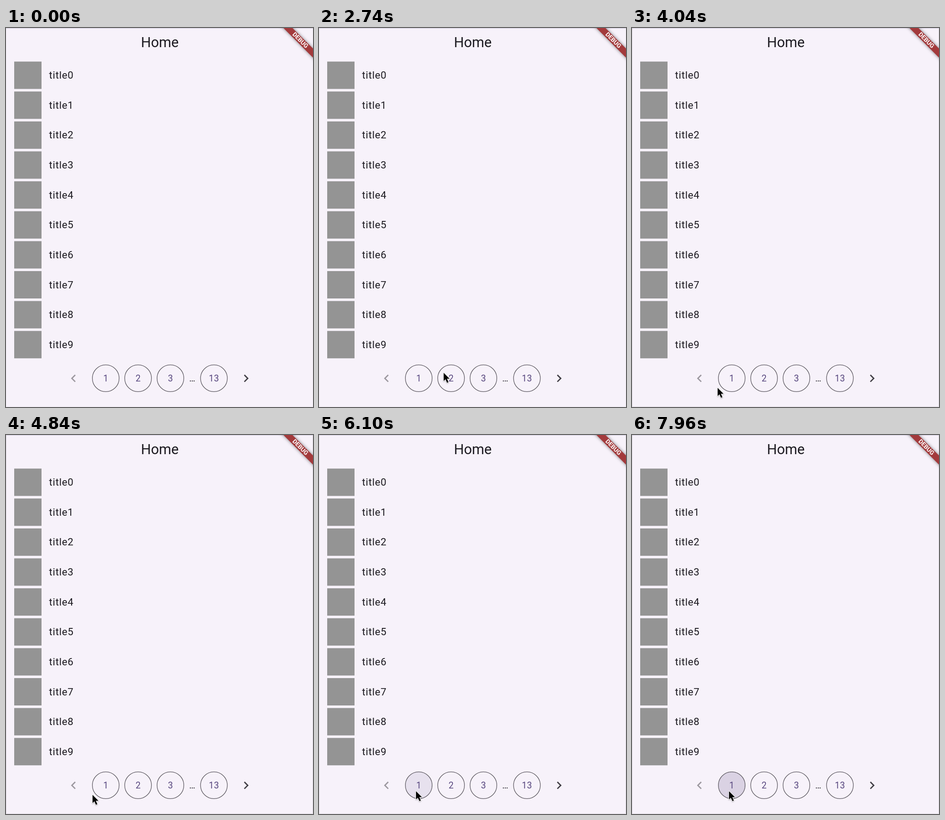
An HTML page that plays this animation: 674x831 px, repeating every 8000 ms.

```html
<!DOCTYPE html>
<html lang="en">
<head>
<meta charset="utf-8">
<title>Home</title>
<style>
  html, body { margin: 0; width: 100%; height: 100%; overflow: hidden; background: #f7f2fa; }
  #stage { position: relative; width: 674px; height: 831px; overflow: hidden; }
  svg { position: absolute; left: 0; top: 0; font-family: Roboto, sans-serif; }
  .title { font-size: 30.8px; fill: #1c1a20; text-anchor: middle; }
  .row { font-size: 22.3px; letter-spacing: .69px; fill: #1c1a20; }
  .page { font-size: 19.6px; letter-spacing: .14px; fill: #58477f; text-anchor: middle; }
  .ring { fill: none; stroke: #5c5860; stroke-width: 1.3; }
  #banner {
    position: absolute; left: 588px; top: 20px; width: 116px; height: 14px;
    transform: rotate(45deg); background: #a33a3c;
    box-shadow: 0 0 7px rgba(0, 0, 0, .5);
    font: 700 13.4px/14px Roboto, sans-serif; color: #fff; text-align: center;
  }
</style>
</head>
<body>
<div id="stage">
  <svg id="view" width="674" height="831" viewBox="0 0 674 831">
    <path d="M0 .5H674" stroke="#cbc4d8"/>
    <path id="edge" d="M.5 1V830.5H673.5V1" fill="none" stroke="#dcd8e0"/>
    <text class="title" x="337.7" y="42.3">Home</text>
    <g id="rows"></g>
    <circle id="ink" cx="219" cy="768" r="29.5" fill="#4a3a70" opacity="0"/>
    <g id="pages"></g>
    <text class="page" x="408.8" y="774.5" style="fill:#1c1a20">…</text>
    <path transform="translate(131.4 751.4) scale(1.4)" fill="#9c989f"
      d="M15.41 7.41L14 6l-6 6 6 6 1.41-1.41L10.83 12z"/>
    <path transform="translate(510.3 751.4) scale(1.4)" fill="#403d44"
      d="M10 6L8.59 7.41 13.17 12l-4.58 4.59L10 18l6-6z"/>
  </svg>
  <div id="banner">DEBUG</div>
  <svg width="674" height="831" viewBox="0 0 674 831">
    <g id="cursor" style="filter:drop-shadow(0 1px 1px rgba(0,0,0,.3))">
      <path d="M1 1V19L5 15.2L8.4 22.8L11.6 21.4L8.3 14H14Z"
        fill="#000" stroke="#fff" stroke-width="2" stroke-linejoin="round" paint-order="stroke"/>
    </g>
  </svg>
</div>
<script>
const LOOP = 8000;
const $ = id => document.getElementById(id);

function add(parent, tag, attrs, text) {
  const el = document.createElementNS('http://www.w3.org/2000/svg', tag);
  for (const k in attrs) el.setAttribute(k, attrs[k]);
  if (text !== undefined) el.textContent = text;
  parent.append(el);
}

for (let i = 0; i < 10; i++) {
  const y = 73.6 + i * 65.63;
  add($('rows'), 'rect', { x: 18, y, width: 60, height: 60, fill: '#949494' });
  add($('rows'), 'text', { class: 'row', x: 94.6, y: y + 37.6 }, 'title' + i);
}

for (const [label, x] of [[1, 219], [2, 290], [3, 361], [13, 456.5]]) {
  add($('pages'), 'circle', { class: 'ring', cx: x, cy: 768, r: 29.4 });
  add($('pages'), 'text', { class: 'page', x, y: 775 }, label);
}

// Steps: [time, value...]
const path = [
  [2440, 680, 600], [2740, 273, 755], [3040, 192, 786], [3340, 187, 788],
  [4420, 187, 788], [4840, 189, 788], [5260, 190, 788], [5760, 212, 780]
];
const ink = [[5440, 0], [5640, .09], [7760, .09], [7940, .17]];

function at(steps, t) {
  if (t <= steps[0][0]) return steps[0].slice(1);
  for (let i = 1; i < steps.length; i++) {
    const a = steps[i - 1], b = steps[i];
    if (t <= b[0]) {
      const k = (t - a[0]) / (b[0] - a[0]);
      return a.slice(1).map((v, j) => v + (b[j + 1] - v) * k);
    }
  }
  return steps[steps.length - 1].slice(1);
}

function draw() {
  const t = performance.now() % LOOP;
  const [x, y] = at(path, t);
  $('cursor').setAttribute('transform', `translate(${x} ${y})`);
  $('ink').setAttribute('opacity', at(ink, t)[0]);
  $('edge').setAttribute('opacity', t < 3580 ? 0.35 : 1);
  requestAnimationFrame(draw);
}
draw();
</script>
</body>
</html>
```
